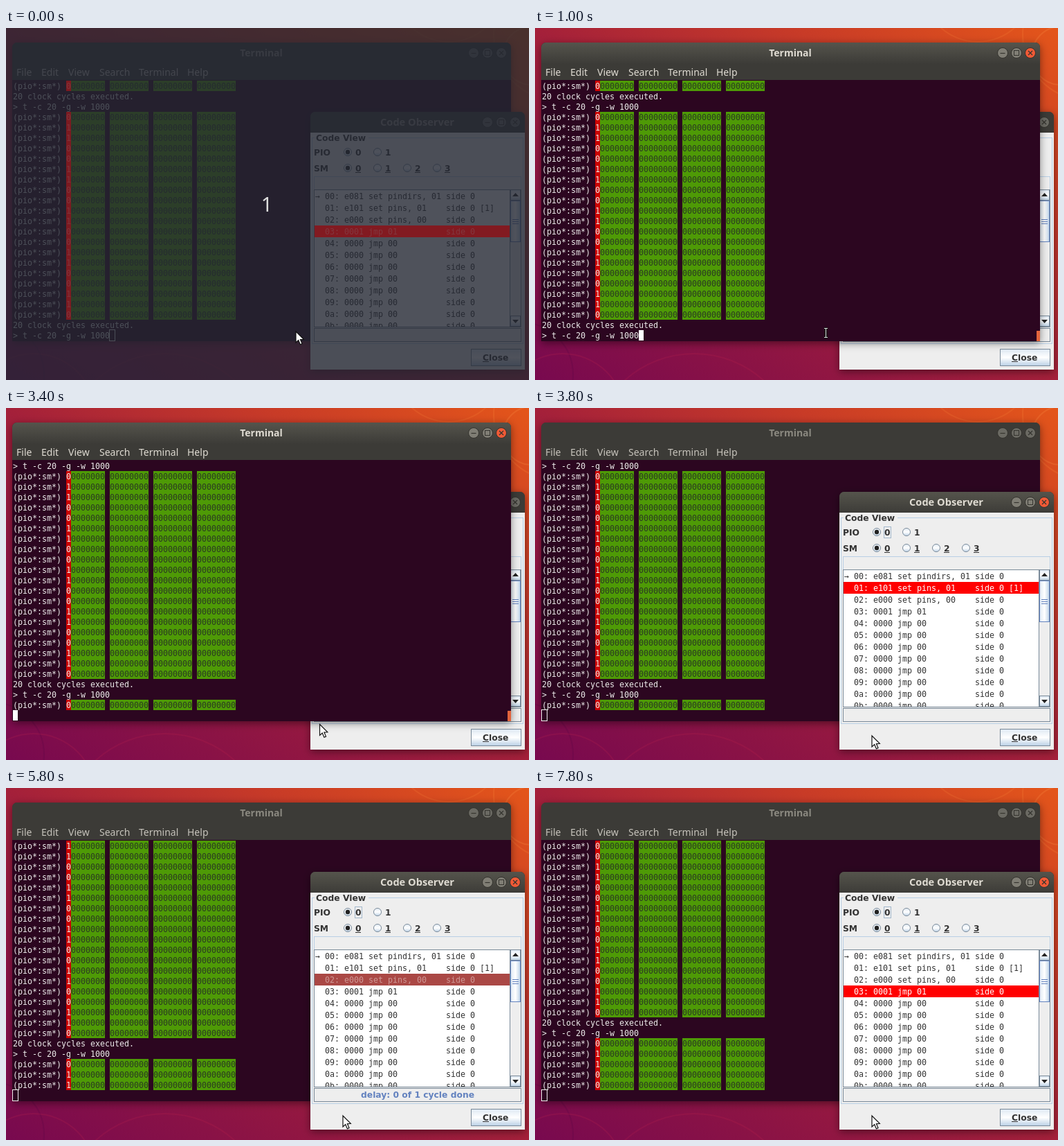
Animation, 756 px wide and 508 px high, one loop 8 s. Source, as an HTML page with a canvas:

```html
<!DOCTYPE html>
<html lang="en">
<head>
<meta charset="utf-8">
<title>Terminal and Code Observer</title>
<style>
html, body { margin: 0; width: 100%; height: 100%; overflow: hidden; background: #a4203a; }
canvas { display: block; }
</style>
</head>
<body>
<canvas id="stage" width="756" height="508"></canvas>
<script>
const g = document.getElementById('stage').getContext('2d');
const LOOP = 8000;
const MONO = '11.63px "DejaVu Sans Mono", monospace';
const BOLD = 'bold 12.3px "DejaVu Sans", sans-serif';
const UI = '14px "Noto Sans", sans-serif';
const EDGE = '#7a8a99', PALE = '#b8cfe5';

function box(x, y, w, h, color) {
  g.fillStyle = color;
  g.fillRect(x, y, w, h);
}
function frame(x, y, w, h, color) {
  g.strokeStyle = color;
  g.lineWidth = 1;
  g.strokeRect(x + .5, y + .5, w - 1, h - 1);
}
function text(s, x, y, font, color, align = 'left') {
  g.font = font;
  g.fillStyle = color;
  g.textAlign = align;
  g.fillText(s, x, y);
}
function disc(x, y, r, fill, stroke) {
  g.beginPath();
  g.arc(x, y, r, 0, 7);
  g.fillStyle = fill;
  g.fill();
  if (stroke) { g.strokeStyle = stroke; g.lineWidth = 1; g.stroke(); }
}
function line(color, width, ...pts) {
  g.beginPath();
  pts.forEach(([x, y]) => g.lineTo(x, y));
  g.strokeStyle = color;
  g.lineWidth = width;
  g.stroke();
}
function ramp(x0, y0, x1, y1, ...stops) {
  const r = g.createLinearGradient(x0, y0, x1, y1);
  stops.forEach((c, i) => r.addColorStop(i / (stops.length - 1), c));
  return r;
}
const metal = (y, h) => ramp(0, y, 0, y + h, '#dde8f3', '#ffffff', PALE);

function wallpaper() {
  box(0, 0, 756, 508, ramp(0, 508, 470, -192, '#78094f', '#8d1444', '#a4203a', '#c83b27', '#e4561a'));
  const arcs = [[800, 10, 95, '#ff904030'], [760, 40, 42, '#ffa05030'], [640, -60, 80, '#ff904028'],
    [-20, 500, 75, '#4a004030'], [40, 560, 90, '#d0305028'], [230, 620, 150, '#d0305024']];
  for (const [x, y, r, color] of arcs) {
    g.beginPath();
    g.arc(x, y, r, 0, 7);
    g.strokeStyle = color;
    g.lineWidth = 2;
    g.stroke();
  }
}

function titleBar(x, y, w, title, mid, size, focus) {
  const shape = () => {
    g.beginPath();
    g.roundRect(x, y, w, 30, [7, 7, 0, 0]);
    g.fill();
  };
  const parts = (face, ink, close, label) => {
    g.fillStyle = face;
    shape();
    text(title, mid, y + 20, `bold ${size}px "Noto Sans", sans-serif`, label, 'center');
    const cy = y + 15;
    [54, 34, 14].forEach((d, i) => disc(x + w - d, cy, 7.5, i === 2 ? close : ink, '#34332e'));
    const dark = '#35342f';
    line(dark, 1.2, [x + w - 57.5, cy + .5], [x + w - 50.5, cy + .5]);
    frame(x + w - 38, cy - 4, 8, 8, dark);
    const c = x + w - 14;
    line(dark, 1.3, [c - 3, cy - 3], [c + 3, cy + 3]);
    line(dark, 1.3, [c + 3, cy - 3], [c - 3, cy + 3]);
  };
  parts('#3c3b37', '#6b6a63', '#6b6a63', '#8b8980');
  if (focus) {
    g.globalAlpha = focus;
    parts(ramp(0, y, 0, y + 30, '#55544c', '#3d3c38'), '#807e75', '#f15a36', '#e0dcd3');
    g.globalAlpha = 1;
  }
}

function windowShadow(x, y, w, h) {
  g.save();
  g.shadowColor = 'rgba(0,0,0,.45)';
  g.shadowBlur = 12;
  g.shadowOffsetY = 3;
  g.fillStyle = '#3c3b37';
  g.beginPath();
  g.roundRect(x, y, w, h, [7, 7, 0, 0]);
  g.fill();
  g.restore();
}

const bit = i => (i + 1 >> 1) & 1;
const DONE = '20 clock cycles executed.', RUN = '> t -c 20 -g -w 1000';
const history = [0, DONE, RUN, ...Array.from({ length: 20 }, (_, i) => bit(i)), DONE, RUN];

function terminal(t, focus) {
  windowShadow(9, 21, 721, 431);
  titleBar(9, 21, 721, 'Terminal', 369, 14, focus);
  box(9, 51, 721, 25, '#3c3b37');
  const menu = { File: 15, Edit: 51, View: 90, Search: 135, Terminal: 192, Help: 262 };
  for (const name in menu) text(name, menu[name], 69, UI, focus ? '#dfdbd2' : '#c6c3bb');
  box(9, 75, 721, 377, '#2c0620');

  const cycles = [2800, 4500, 5800, 6800, 7800].filter(at => t >= at).length;
  const lines = [...history, ...Array.from({ length: cycles }, (_, i) => bit(i))];
  if (cycles) lines.push('');
  lines.slice(-25).forEach((s, i) => {
    const y = 76 + 15 * i, base = y + 12;
    if (typeof s === 'string') return text(s, 10, base, MONO, '#eeeeec');
    text('(pio*:sm*)', 10, base, MONO, '#eeeeec');
    box(87, y, 7, 15, '#cc0000');
    box(94, y, 49, 15, '#4e9a06');
    for (const x of [150, 213, 276]) box(x, y, 56, 15, '#4e9a06');
    text(s, 87, base, MONO, '#eeeeec');
    text('0000000 00000000 00000000 00000000', 94, base, MONO, '#2b3b22');
  });

  const cx = cycles ? 10 : 150;
  if (!focus) frame(cx - 1, 435, 9, 17, '#eeeeec');
  else if (t < 1400 || t >= 2400) box(cx, 436, 7, 15, '#ffffff');
  box(725, 437, 5, 15, '#e2643c');
}

const program = ['e081 set pindirs, 01 side 0', 'e101 set pins, 01    side 0 [1]', 'e000 set pins, 00    side 0'];
for (let i = 3; i < 12; i++) program.push(i === 3 ? '0001 jmp 01          side 0' : '0000 jmp 00          side 0');

function radio(x, y, label, on, underline) {
  disc(x, y, 5.5, metal(y - 6, 12), EDGE);
  if (on) disc(x, y, 3.2, '#222');
  text(label, x + 11, y + 5, BOLD, '#333');
  if (underline) box(x + 11, y + 6, 8, 1, '#333');
}

function arrowButton(y, dir) {
  box(729, y, 15, 16, metal(y, 16));
  frame(729, y, 15, 16, EDGE);
  const c = y + 8;
  g.beginPath();
  g.moveTo(732, c - 2 * dir);
  g.lineTo(741, c - 2 * dir);
  g.lineTo(736.5, c + 3 * dir);
  g.fillStyle = '#222';
  g.fill();
}

function observer(t, focus) {
  windowShadow(440, 121, 310, 372);
  titleBar(440, 121, 310, 'Code Observer', 594.5, 14.6, focus);
  box(440, 151, 310, 342, '#eeeeee');

  frame(442, 158, 306, 298, PALE);
  box(446, 152, 78, 14, '#eeeeee');
  text('Code View', 448, 163, BOLD, '#333');
  text('PIO', 445, 184, BOLD, '#333');
  text('SM', 445, 207, BOLD, '#333');
  [494, 537].forEach((x, i) => radio(x, 179, i, !i));
  [494, 537, 580, 623].forEach((x, i) => radio(x, 202, i, !i, true));
  if (focus) frame(504, 171, 11, 17, '#a3b8cc');
  frame(445, 214, 300, 20, PALE);

  // Program listing
  box(445, 233, 300, 199, '#ffffff');
  const waiting = t >= 4800 && t < 6000;
  const current = t < 2800 ? 3 : t < 4800 ? 1 : t < 7000 ? 2 : 3;
  g.save();
  g.beginPath();
  g.rect(446, 234, 283, 197);
  g.clip();
  program.forEach((code, i) => {
    const y = 234 + 17 * i, hot = i === current;
    if (hot) box(446, y, 282, 17, waiting ? '#aa4845' : '#ff0000');
    const row = (i ? '  ' : '→ ') + i.toString(16).padStart(2, '0') + ': ' + code;
    text(row, 447, y + 13, MONO, !hot ? '#333' : waiting ? '#cf9895' : '#ffffff');
  });
  g.restore();

  box(729, 234, 15, 197, '#eeeeee');
  arrowButton(233, -1);
  arrowButton(415, 1);
  box(729, 249, 15, 60, ramp(729, 0, 744, 0, '#dde8f3', '#ffffff', PALE));
  frame(729, 249, 15, 60, '#6382bf');
  for (const y of [276, 279, 282]) box(732, y, 9, 1, '#6382bf');
  frame(445, 233, 300, 199, EDGE);
  line(EDGE, 1, [728.5, 234], [728.5, 431]);

  // Delay progress
  const full = t >= 6000 && t < 7000;
  box(445, 433, 300, 20, full ? '#a3b8cc' : '#eeeeee');
  frame(445, 433, 300, 20, EDGE);
  if (waiting || full)
    text(`delay: ${+full} of 1 cycle done`, 595, 447, BOLD, full ? '#eeeeee' : '#6382bf', 'center');

  box(672, 463, 73, 25, metal(463, 25));
  frame(672, 463, 73, 25, EDGE);
  text('Close', 689, 480, BOLD, '#333');
  box(689, 481, 9, 1, '#333');
}

function arrow(x, y) {
  g.beginPath();
  [[0, 0], [0, 16], [3.7, 12.6], [6.4, 18.8], [9, 17.6], [6.4, 11.6], [11.3, 11.3]]
    .forEach(([dx, dy]) => g.lineTo(x + dx, y + dy));
  g.closePath();
  g.fillStyle = '#fff';
  g.fill();
  g.strokeStyle = '#111';
  g.lineWidth = 1.2;
  g.stroke();
}

function beam(x, y) {
  for (const [color, w] of [['#111', 3], ['#ddd', 1]]) {
    line(color, w, [x + .5, y - 6], [x + .5, y + 6]);
    for (const dy of [-6.5, 6.5]) line(color, w, [x - 2, y + dy], [x + 3, y + dy]);
  }
}

function pointer(t) {
  if (t < 500) return arrow(419, 438);
  if (t < 2400) return beam(420, 440);
  if (t < 3200) return;
  const p = Math.min(1, Math.floor((t - 3200) / 100) / 4);
  const x = 420 + 67 * p, y = 440 + 33 * p;
  y < 452 ? beam(x, y) : arrow(x, y);
}

function countdown() {
  box(0, 0, 756, 508, 'rgba(36,39,50,.8)');
  const tint = 'rgba(190,20,25,.45)';
  box(446, 285, 282, 17, tint);
  box(87, 76, 7, 15, tint);
  box(87, 121, 7, 300, tint);
  text('1', 377, 265, '29px "Noto Sans", sans-serif', '#dddddd', 'center');
}

function draw(t) {
  const front = t >= 900 && t < 3700;
  const termFocus = !front ? 0 : t < 1000 ? .5 : 1;
  const obsFocus = t < 3700 ? 0 : t < 3800 ? .5 : 1;
  wallpaper();
  if (front) {
    observer(t, obsFocus);
    terminal(t, termFocus);
  } else {
    terminal(t, termFocus);
    observer(t, obsFocus);
  }
  if (t < 500) countdown();
  pointer(t);
}

const start = performance.now();
function tick() {
  draw((performance.now() - start) % LOOP);
  requestAnimationFrame(tick);
}
tick();
</script>
</body>
</html>
```
